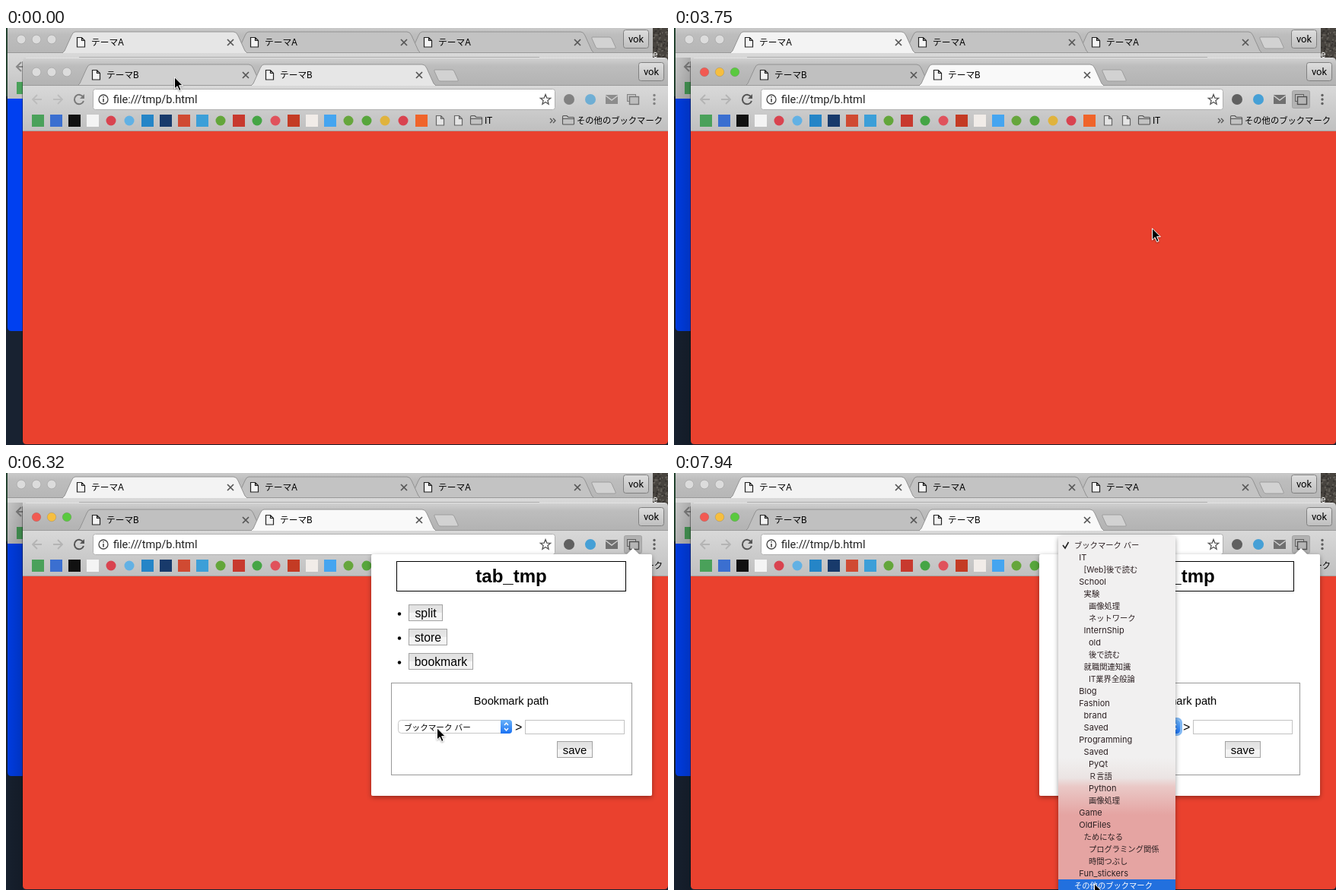
An HTML page that plays this animation: 870x549 px, repeating every 8000 ms.

```html
<!DOCTYPE html>
<html lang="ja">
<head>
<meta charset="utf-8">
<title>tab_tmp</title>
<style>
  html, body { margin: 0; width: 100%; height: 100%; overflow: hidden; background: #182231; }
  svg { display: block; width: 870px; height: 549px; }
  text { font-family: Roboto, "Noto Sans CJK JP", sans-serif; white-space: pre; }
  .jp { font-family: Inter, "Noto Sans CJK JP", sans-serif; }
  .web { font-family: "Liberation Sans", Arial, sans-serif; }
</style>
</head>
<body>
<svg id="stage" viewBox="0 0 870 549">
  <defs>
    <linearGradient id="title" x2="0" y2="1"><stop stop-color="#d2d2d2"/><stop offset=".3" stop-color="#bdbdbd"/><stop offset="1" stop-color="#b3b3b3"/></linearGradient>
    <linearGradient id="bar" x2="0" y2="1"><stop stop-color="#d9d9d9"/><stop offset="1" stop-color="#c0c0c0"/></linearGradient>
    <linearGradient id="key" x2="0" y2="1"><stop stop-color="#e0e0e0"/><stop offset=".5" stop-color="#e8e8e8"/><stop offset=".5" stop-color="#f5f5f5"/><stop offset="1" stop-color="#f1f1f1"/></linearGradient>
    <linearGradient id="user" x2="0" y2="1"><stop stop-color="#dedede"/><stop offset="1" stop-color="#bfbfbf"/></linearGradient>
    <linearGradient id="stepper" x2="0" y2="1"><stop stop-color="#6ab2f9"/><stop offset="1" stop-color="#1a72f3"/></linearGradient>
    <linearGradient id="dusk"><stop stop-opacity=".06"/><stop offset="1" stop-opacity=".2"/></linearGradient>
    <linearGradient id="glass" gradientUnits="userSpaceOnUse" x1="0" y1="375" x2="0" y2="450">
      <stop stop-color="#f1f0f0"/><stop offset=".35" stop-color="#ebe4e3"/><stop offset=".5" stop-color="#eac9c7"/><stop offset="1" stop-color="#e5a4a2"/>
    </linearGradient>
    <filter id="soft" x="-10%" y="-10%" width="120%" height="125%"><feDropShadow dx="0" dy="2" stdDeviation="3" flood-opacity=".38"/></filter>
    <filter id="pointerShade" x="-50%" y="-50%" width="200%" height="200%"><feDropShadow dx="0" dy="1" stdDeviation="1" flood-opacity=".4"/></filter>
  </defs>
</svg>
<script>
const LOOP = 8000;
const stage = document.getElementById('stage');
const $ = id => document.getElementById(id);

const rect = (x, y, w, h, fill, more = '') =>
  `<rect x="${x}" y="${y}" width="${w}" height="${h}" fill="${fill}" ${more}/>`;
const path = (d, fill, more = '') => `<path d="${d}" fill="${fill}" ${more}/>`;
const line = (d, color, width = 1, more = '') =>
  path(d, 'none', `stroke="${color}" stroke-width="${width}" ${more}`);
const circle = (x, y, r, fill, more = '') => `<circle cx="${x}" cy="${y}" r="${r}" fill="${fill}" ${more}/>`;
const text = (x, y, size, s, cls = '', more = '') =>
  `<text x="${x}" y="${y}" font-size="${size}" class="${cls}" ${more}>${s}</text>`;
const group = (id, body, more = '') => `<g id="${id}" ${more}>${body}</g>`;

const pageIcon = (x, y, color = '#222', fill = '#f4f4f4') =>
  path(`M${x + .5} ${y + .5}h6l4 4v8.5h-10zM${x + 6.5} ${y + .5}v4h4`, fill, `stroke="${color}" stroke-width="1.2"`);
const folder = (x, y) =>
  path(`M${x + .5} ${y + 2}q0-1.5 1.5-1.5h4l2 2h6.5q1 0 1 1v7.5q0 1-1 1h-13q-1 0-1-1zM${x + .5} ${y + 4.5}h15`, '#c2c2c2', 'stroke="#555" stroke-width="1.1"');

// The outline stays open at the bottom so an active tab merges with its toolbar.
function tab(x, y, label, fill, id) {
  return path(`M${x} ${y + 29}l3-3 9-20q2-5 5-5H${x + 225}q4 0 6 5l9 20 3 3`, fill,
      `stroke="#8d8d8d" stroke-width=".9" ${id ? `id="${id}"` : ''}`) +
    pageIcon(x + 19, y + 8) +
    text(x + 38, y + 19, 11.7, label, 'jp') +
    line(`M${x + 217} ${y + 11}l8 8m0-8l-8 8`, '#555', 1.7);
}
const newTab = (x, y) =>
  path(`M${x + 2} ${y}h22q2 0 3 2l5 11q1 2-1 2h-22q-2 0-3-2l-5-11q-1-2 1-2z`, '#d2d2d2', 'stroke="#999" stroke-width=".9"');
const userButton = (x, y) =>
  rect(x + .5, y + .5, 33, 24, 'url(#user)', 'rx="3" stroke="#808080"') +
  text(x + 17, y + 17, 13, 'vok', '', 'text-anchor="middle"');
const lights = (x, y, colors) =>
  colors.map((c, i) => circle(x + 20 * i, y, 5.8, c, 'stroke="#000" stroke-opacity=".14" stroke-width=".8"')).join('');
const grey = ['#dcdcdc', '#dcdcdc', '#dcdcdc'];

function desktop() {
  let seed = 7, out = rect(0, 0, 870, 549, '#182231') + rect(0, 0, 2, 90, '#254431') + rect(848, 0, 22, 60, '#48443f');
  const random = () => (seed = seed * 16807 % 2147483647) / 2147483647;
  for (let i = 0; i < 90; i++)
    out += rect(850 + random() * 20, random() * 40, 2, 2, random() < .5 ? '#35322f' : '#64605a');
  return out + text(850, 39, 12, 'e', '', 'fill="#eee"');
}

function backWindow() {
  return rect(2, -6, 848, 50, 'url(#title)') +
    rect(2, 32, 848, 61, 'url(#bar)') +
    lights(20, 15, grey) +
    tab(530, 4, 'テーマA', '#c3c3c3') + tab(302, 4, 'テーマA', '#c3c3c3') +
    line('M2 32.5H850', '#999') +
    tab(74, 4, 'テーマA', '#e6e6e6', 'backTab') +
    newTab(769, 12) + userButton(811, 2) +
    line('M96 38.5H701', '#aaa') +
    line('M24 51H14m6-6l-6 6 6 6', '#888', 2) +
    rect(14, 71, 16, 16, '#4aa15a') +
    path('M2 93H40V399H7q-5 0-5-5z', '#0040f0');
}

function bookmarks() {
  const colors = ['#4aa15a', '#3b6fd0', '#111', '#f4f4f4', '#d9434f', '#62b1e4', '#2585c7', '#183a6b', '#d04a32',
    '#3c9fd8', '#63a63a', '#c8392e', '#45a545', '#e0525c', '#c43b24', '#f1ece8', '#45a5f0', '#66a63c', '#57a63c',
    '#e0b33d', '#d9434f', '#f0642a'];
  const round = [4, 5, 10, 12, 13, 17, 18, 19, 20];
  return colors.map((c, i) => round.includes(i) ? circle(42 + 24 * i, 122, 6.5, c) : rect(34 + 24 * i, 114, 16, 16, c)).join('') +
    pageIcon(565, 115, '#666', '#e4e4e4') + pageIcon(589, 115, '#666', '#e4e4e4') +
    folder(610, 115) + text(629, 126, 12, 'IT') +
    line('M715 119l3 3-3 3m4-6l3 3-3 3', '#555', 1.3) +
    folder(731, 115) + text(750, 126, 11.3, 'その他のブックマーク', 'jp');
}

function toolbar() {
  const star = Array.from({ length: 10 }, (_, i) => {
    const r = i % 2 ? 3 : 7, a = Math.PI * (i / 5 - .5);
    return `${(709 + r * Math.cos(a)).toFixed(1)},${(94.5 + r * Math.sin(a)).toFixed(1)}`;
  }).join(' ');
  const icons =
    line('M47 94H35m6-6l-6 6 6 6M62 94H74m-6-6l6 6-6 6', '#b4b4b4', 1.8) +
    line('M101.5 91A6.2 6.2 0 1 0 102 96', '#555', 2) + path('M103 87v6h-6z', '#555') +
    circle(740, 94, 7, '#606060') + circle(768, 94, 7, '#46a0d6') +
    rect(788, 88, 16, 12, '#707070') + line('M788 89l8 6 8-6', '#d0d0d0', 1.4) +
    [88.5, 94, 99.5].map(y => circle(852, y, 1.7, '#606060')).join('');
  return rect(114.5, 80.5, 607, 27, '#fff', 'rx="3" stroke="#b0b0b0"') +
    circle(128, 94, 6, 'none', 'stroke="#444" stroke-width="1.3"') + line('M128 93v4.5M128 90v1.6', '#444', 1.6) +
    text(141, 99, 14.55, 'file:///tmp/b.html', '', 'fill="#222"') +
    `<polygon points="${star}" fill="none" stroke="#555" stroke-width="1.3"/>` +
    group('hover', rect(812.5, 82.5, 23, 23, '#b2b2b2', 'rx="2" stroke="#a2a2a2"')) +
    group('icons', icons +
      rect(816.5, 87.5, 11, 9, '#bbb', 'stroke="#606060"') + rect(819.5, 90.5, 12, 10, '#b5b5b5', 'stroke="#505050" stroke-width="1.4"'));
}

function frontWindow() {
  return rect(0, 39, 22, 510, 'url(#dusk)', 'id="shade"') +
    line('M21.5 44V543', '#000', 1, 'opacity=".35"') +
    path('M22 75V44q0-5 5-5H865q5 0 5 5v31z', 'url(#title)') +
    rect(22, 75, 848, 60, 'url(#bar)') + line('M26 39.5H866', '#e2e2e2') +
    group('idleLights', lights(40, 58, grey)) +
    group('liveLights', lights(40, 58, ['#f25a52', '#f6be3f', '#5ac93f'])) +
    tab(94, 47, 'テーマB', '#c6c6c6', 'firstTab') +
    group('closeHover', circle(315, 62, 7, '#e0604f') + line('M312 59l6 6m0-6l-6 6', '#fff', 1.5)) +
    line('M22 75.5H870', '#9a9a9a') +
    tab(322, 47, 'テーマB', '#e6e6e6', 'activeTab') +
    newTab(562, 55) + userButton(831, 45) +
    toolbar() + bookmarks() +
    path('M22 135H870V543q0 5-5 5H27q-5 0-5-5z', '#ea412e') +
    line('M22 135.5H870', '#a6a09e');
}

const key = (x, y, w, label, size = 15.8) =>
  rect(x + .5, y + .5, w - 1, 21, 'url(#key)', 'stroke="#a3a3a3"') +
  text(x + w / 2, y + 16.5, size, label, 'web', 'text-anchor="middle"');

function popup() {
  const rows = [['split', 45], ['store', 51], ['bookmark', 85]];
  const shell = h => path(`M482 107H816l8-8 8 8H847q2 0 2 2V${107 + h - 2}q0 2-2 2H482q-2 0-2-2V109q0-2 2-2z`, '#fff', 'filter="url(#soft)"');
  return group('popup',
    group('small', shell(182)) + group('large', shell(318)) +
    rect(513.5, 116.5, 301, 39, '#fff', 'stroke="#000"') +
    text(664, 144, 24, 'tab_tmp', 'web', 'text-anchor="middle" font-weight="700"') +
    group('ring', rect(527.5, 171.5, 48, 25, 'none', 'rx="3" stroke="#8fbef5" stroke-width="3"')) +
    rows.map(([s, w], i) => circle(517, 185.5 + 32 * i, 2.2, '#000') + key(529, 173 + 32 * i, w, s)).join('') +
    group('form',
      rect(506.5, 276.5, 316, 121, '#fff', 'stroke="#999"') +
      text(664, 305, 14.65, 'Bookmark path', 'web', 'text-anchor="middle"') +
      group('selectRing', rect(513.5, 323.5, 153, 21, 'none', 'rx="5" stroke="#82b8f3" stroke-width="3"')) +
      rect(515.5, 325.5, 149, 17, '#fff', 'rx="4" stroke="#c6c6c6"') +
      text(523, 339, 10.6, 'ブックマーク バー', 'jp') +
      path('M650 325h11q4 0 4 4v10q0 4-4 4h-11z', 'url(#stepper)') +
      line('M655 332l2.5-3 2.5 3m-5 4l2.5 3 2.5-3', '#fff', 1.4) +
      text(669, 340, 16, '&gt;', 'web') +
      rect(682.5, 325.5, 130, 18, '#fff', 'stroke="#c2c2c2"') +
      key(724, 353, 47, 'save', 14.8)));
}

// The leading digit is the nesting depth.
const items = `0ブックマーク バー|1IT|2[Web]後で読む|1School|2実験|3画像処理|3ネットワーク|2InternShip|3old|3後で読む|2就職関連知識|3IT業界全般論|1Blog|1Fashion|2brand|2Saved|1Programming|2Saved|3PyQt|3Ｒ言語|3Python|3画像処理|1Game|1OldFiles|2ためになる|3プログラミング関係|3時間つぶし|1Fun_stickers|0その他のブックマーク`.split('|');

function menu() {
  const labels = items.map((item, i) => {
    const s = item.slice(1), size = /[^\x20-\x7e]/.test(s) ? 10.3 : 11;
    return text(526 + 6.3 * item[0], 16 * i + 16, size, s, 'jp label', 'fill="#2c2022"');
  }).join('');
  return group('menu',
    rect(505, 0, 154, 475, 'url(#glass)', 'id="sheet" rx="4" filter="url(#soft)"') +
    group('list', rect(505, 4, 154, 16, '#2270de', 'id="mark"') + labels +
      line('M511 12l3 4 4.5-8', '#222', 1.6, 'id="check"')));
}

const pointer = group('pointer',
  path('M.5 .8V16l3.6-3.3 2.5 5.8 2.5-1.1-2.5-5.7h4.7z', '#000', 'stroke="#fff" stroke-width="1" filter="url(#pointerShade)"'));

stage.insertAdjacentHTML('beforeend', desktop() + backWindow() + frontWindow() + popup() + menu() + pointer);
const labels = [...document.querySelectorAll('.label')];

// time, x, y
const moves = [
  [0, 221, 64], [930, 221, 64], [1240, 545, 57], [1640, 541, 56], [1720, 302, 56], [1990, 302, 56],
  [2200, 316, 60], [2420, 455, 83], [2810, 822, 101], [2990, 819, 95], [3540, 819, 95],
  [3750, 628, 263], [3840, 628, 263], [3960, 584, 246], [4380, 585, 240], [4500, 572, 266],
  [4670, 555, 262], [4910, 560, 253], [5830, 560, 253], [6320, 566, 335], [6680, 566, 335],
  [6840, 552, 450], [7510, 552, 450], [7940, 552, 540], [8000, 552, 540]
];
const scroll = [[0, 322], [6930, 322], [7070, 83], [8000, 83]];

function at(table, t) {
  const i = Math.max(1, table.findIndex(row => row[0] > t));
  const a = table[i - 1], b = table[i], k = (t - a[0]) / (b[0] - a[0]);
  return a.slice(1).map((v, n) => v + (b[n + 1] - v) * k);
}
const show = (id, on) => $(id).style.display = on ? '' : 'none';
const fill = (id, color) => $(id).setAttribute('fill', color);

function draw(t) {
  const live = t >= 480, opened = t >= 6550, expanded = t >= 5450;
  const [x, y] = at(moves, t);
  $('pointer').setAttribute('transform', `translate(${x.toFixed(1)} ${y.toFixed(1)})`);

  show('idleLights', !live);
  show('liveLights', live);
  show('shade', live);
  $('icons').setAttribute('opacity', live ? 1 : .7);
  fill('backTab', live ? '#f3f3f3' : '#e6e6e6');
  fill('activeTab', t >= 2600 ? '#f9f9f9' : '#e6e6e6');
  fill('firstTab', t < 1030 || (t >= 1660 && t < 2600) ? '#d0d0d0' : '#c0c0c0');
  show('closeHover', t >= 2150 && t < 2480);
  show('hover', t >= 2870);
  $('hover').setAttribute('opacity', t >= 3220 ? 1 : .6);

  show('popup', t >= 3870);
  $('popup').setAttribute('transform', expanded ? '' : 'translate(-1 4)');
  for (const id of ['small', 'ring']) show(id, !expanded);
  for (const id of ['large', 'form']) show(id, expanded);
  show('selectRing', opened);

  show('menu', opened);
  if (!opened) return;
  const top = Math.round(at(scroll, t)[0]);
  const chosen = Math.max(0, Math.min(items.length - 1, Math.floor((y - top - 4) / 16)));
  $('sheet').setAttribute('y', top);
  $('list').setAttribute('transform', `translate(0 ${top})`);
  $('mark').setAttribute('y', 4 + 16 * chosen);
  labels.forEach((label, i) => label.setAttribute('fill', i === chosen ? '#fff' : '#2c2022'));
  $('check').setAttribute('stroke', chosen ? '#222' : '#fff');
}

function tick() {
  draw(performance.now() % LOOP);
  requestAnimationFrame(tick);
}
tick();
</script>
</body>
</html>
```
